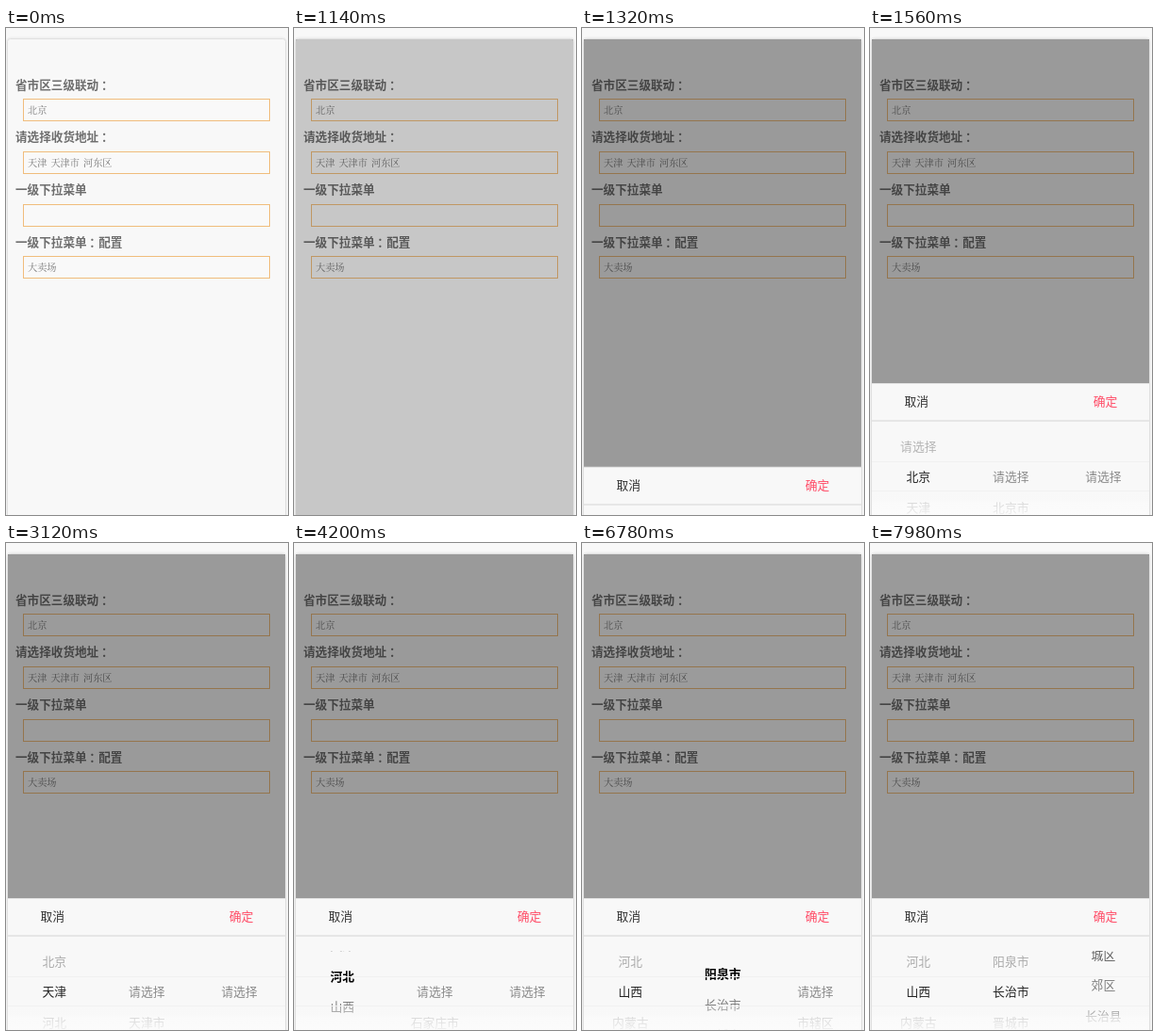
Animation, 299 px wide and 517 px high, one loop 8000 ms. Source, as an HTML page:

```html
<!DOCTYPE html>
<html lang="zh-CN">
<head>
<meta charset="utf-8">
<style>
  html, body { margin: 0; width: 100%; height: 100%; overflow: hidden; background: #f8f8f8; }
  svg { display: block; width: 299px; height: 517px; font-family: "Noto Sans CJK SC", "Noto Sans CJK", sans-serif; }
  .label { font-size: 12.6px; font-weight: 700; fill: #6e6e6e; }
  .value { font-family: "Noto Serif CJK SC", "Noto Sans CJK SC", serif; font-size: 10.2px; fill: #777; word-spacing: 1.4px; }
  .box { fill: #f9f9f9; stroke: #f0bd7c; }
  .cell { font-size: 12.8px; text-anchor: middle; }
</style>
</head>
<body>
<svg viewBox="0 0 299 517">
  <defs>
    <clipPath id="wheel"><rect x="2" y="433" width="294" height="84"/></clipPath>
    <linearGradient id="fade" x1="0" y1="0" x2="0" y2="1">
      <stop offset="0" stop-color="#f8f8f8" stop-opacity=".2"/>
      <stop offset=".33" stop-color="#f9f9f9" stop-opacity=".45"/>
      <stop offset=".4" stop-color="#fbfbfb" stop-opacity=".72"/>
      <stop offset="1" stop-color="#fcfcfc" stop-opacity=".95"/>
    </linearGradient>
  </defs>
  <rect width="299" height="517" fill="#f8f8f8"/>
  <rect x="1" y="10.5" width="296" height="520" rx="4" fill="none" stroke="#f0f0f0" stroke-width="2"/>
  <rect x="1.5" y="11.5" width="295" height="520" rx="3" fill="#f8f8f8" stroke="#e0e0e0"/>
  <g id="form"></g>
  <rect id="shade" x="2" y="12" width="294" height="505" fill="#000"/>
  <g id="panel">
    <rect x="2" y="377" width="294" height="200" fill="#f8f8f8"/>
    <path d="M2 377.5H296" stroke="#e4e4e4"/>
    <path d="M2 417H296" stroke="#e6e6e6" stroke-width="2"/>
    <text class="cell" x="49.3" y="401.2" fill="#333">取消</text>
    <text class="cell" x="249.5" y="401.2" fill="#ff4b66">确定</text>
    <g id="rows" clip-path="url(#wheel)"></g>
    <rect x="2" y="418" width="294" height="33" fill="#f8f8f8" opacity=".38"/>
    <rect x="2" y="491" width="294" height="30" fill="url(#fade)"/>
    <path d="M2 460.5H296M2 491.5H296" stroke="#f1f1f1"/>
  </g>
</svg>
<script>
const LOOP = 8000, TICK = 60, ROW = 32.5, CENTER = 477, NONE = '请选择';
const $ = id => document.getElementById(id);

const fields = [
  ['省市区三级联动：', '北京', 60.5, 76],
  ['请选择收货地址：', '天津 天津市 河东区', 115.5, 132],
  ['一级下拉菜单', '', 171.5, 188],
  ['一级下拉菜单：配置', '大卖场', 227.5, 243]
];

// Centres the full-width colon in its cell
const centerColon = label =>
  label.replace(/：(.*)/, '<tspan dx="2.8">：</tspan><tspan dx="-2.8">$1</tspan>');

$('form').innerHTML = fields.map(([label, value, y, top]) => `
  <text class="label" x="10" y="${y + 4.5}">${centerColon(label)}</text>
  <rect class="box" x="18.5" y="${top - .5}" width="261" height="23"/>
  <text class="value" x="23" y="${top + 15.2}">${value}</text>`).join('');

const provinces = [NONE, '北京', '天津', '河北', '山西', '内蒙古'];
const cities = [
  [NONE], [NONE, '北京市'], [NONE, '天津市'], [NONE, '石家庄市'],
  [NONE, '太原市', '大同市', '阳泉市', '长治市', '晋城市']
];
const districts = [NONE, '市辖区', '城区', '郊区', '长治县', '襄垣县'];

// Each move: start, end, first row, last row, easing exponent
const moves = [
  [[2700, 3120, 1, 2, 1], [3600, 3720, 2, 3, 1], [4200, 4260, 3, 4, 1]],
  [[5460, 5580, 0, 1, 1.26], [6240, 6360, 1, 3, 1], [6780, 6960, 3, 4, .39]],
  [[7380, 7500, 0, 2, 1], [7920, 8040, 2, 4, 1.22]]
];

function wheelAt(list, t) {
  let selected = list[0][2];
  for (const [start, end, from, to, power] of list) {
    if (t < start) break;
    if (t < end) {
      const p = (t - start + TICK) / (end - start + TICK);
      return { pos: from + (to - from) * p ** power, selected: from, moving: true };
    }
    selected = to;
  }
  return { pos: selected, selected, moving: false };
}

function cellColor(name, active, moving) {
  if (name === NONE) return moving ? '#777' : '#8c8c8c';
  if (!active) return '#7c7c7c';
  return moving ? '#000' : '#222';
}

function column(items, wheel, x) {
  return items.map((name, i) => {
    const y = CENTER + (i - wheel.pos) * ROW;
    if (y < 420 || y > 530) return '';
    const active = i === wheel.selected;
    // The held row is emphasised only while it is near the centre
    const bold = active && wheel.moving && name !== NONE && Math.abs(y - CENTER) < ROW;
    return `<text class="cell" x="${x}" y="${y + 4.2}" font-weight="${bold ? 700 : 400}" fill="${cellColor(name, active, wheel.moving)}">${name}</text>`;
  }).join('');
}

function draw(time) {
  const t = Math.floor(time / TICK) * TICK;
  $('shade').setAttribute('opacity', t < 1140 ? 0 : t < 1200 ? .2 : .38);
  const p = Math.min(1, Math.max(0, (t - 1200) / 360));
  $('panel').setAttribute('transform', `translate(0 ${200 * (1 - p) ** 2})`);

  const [province, city, district] = moves.map(list => wheelAt(list, t));
  const areas = city.selected ? districts : [NONE];
  $('rows').innerHTML = column(provinces, province, 51.3)
    + column(cities[province.selected], city, 149.3)
    + column(areas, district, 247.4);
}

const begin = performance.now();
function frame() {
  draw((performance.now() - begin) % LOOP);
  requestAnimationFrame(frame);
}
frame();
</script>
</body>
</html>
```
